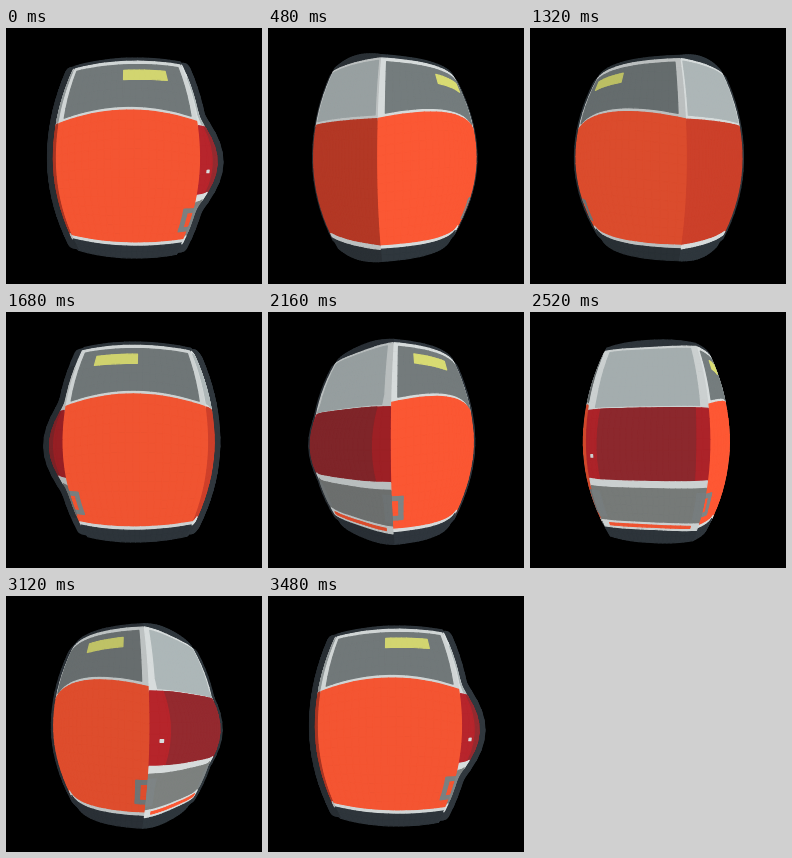
These frames come from a looping animation (256 px wide and 256 px high, 3600 ms). An HTML page with a canvas:

```html
<!DOCTYPE html>
<html>
<head>
<meta charset="utf-8">
<style>
html, body { margin: 0; width: 100%; height: 100%; overflow: hidden; background: #000; }
canvas { display: block; width: 100vw; height: 100vh; }
</style>
</head>
<body>
<canvas id="stage" width="256" height="256"></canvas>
<script>
const ctx = document.getElementById('stage').getContext('2d');
const STEP = 120, STEPS = 30, TURN = Math.PI * 2;
const MID = 128, EYE = 130, AXIS = -7;
const DARK = [46, 53, 59], PALE = [208, 213, 213], LIGHT = [168, 177, 178],
      GREY = [113, 120, 121], YELLOW = [210, 213, 112], ORANGE = [244, 85, 50],
      BRICK = [198, 62, 41], HOSE = [122, 128, 129], RED = [176, 36, 42],
      WINE = [143, 41, 46], STEEL = [121, 125, 123];
let cosA = 1, sinA = 0;

// Faces run left to right as seen from outside: corners, bulge, outward normal.
const front = { a: [-73, 40], b: [60, 56], out: [0, 22], n: [0, 1] };
const back = { a: [60, -56], b: [-73, -40], out: [0, -22], n: [0, -1] };
const pump = { a: [60, 56], b: [60, -56], out: [20, 0], n: [1, 0] };
const plain = { a: [-73, -40], b: [-73, 40], out: [-6, 0], n: [-1, 0] };
const faces = [front, back, pump, plain];

const mix = (a, b, t) => a + (b - a) * t;

function swellAt(face, u, h) {
  if (face !== pump) return 1 - u * u;
  return (1 - u ** 4) * Math.max(0.25, 1 - ((h - 5) / 45) ** 2);
}

function project(face, u, h) {
  const t = (u + 1) / 2;
  const girth = 1 - (h < 0 ? 0.4 : 0.46) * (h / 100) ** 2;
  const swell = swellAt(face, u, h);
  const px = mix(face.a[0], face.b[0], t) + face.out[0] * swell;
  const pz = mix(face.a[1], face.b[1], t) + face.out[1] * swell;
  const x = AXIS + (px - AXIS) * girth, z = pz * girth;
  const depth = z * cosA - x * sinA;
  return [
    MID + (x * cosA + z * sinA) * (1 + 0.002 * depth),
    EYE + h * (1 + 0.0045 * depth)
  ];
}

// Light comes from the right.
function shade(face, rgb) {
  const side = face.n[0] * cosA + face.n[1] * sinA;
  const k = 1 + side * (side < 0 ? 0.15 : 0.04);
  return `rgb(${rgb.map(c => Math.min(255, Math.round(c * k)))})`;
}

const at = (h, u) => typeof h === 'function' ? h(u) : h;

// Fills a patch of a face, skipping the parts turned away from the viewer.
function patch(face, u0, u1, top, bottom, rgb, line = 1.2) {
  const cols = Math.max(1, Math.ceil((u1 - u0) * 10));
  const tall = at(bottom, 0) - at(top, 0);
  const rows = Math.max(1, Math.ceil(tall / 8));
  ctx.fillStyle = ctx.strokeStyle = shade(face, rgb);
  ctx.lineWidth = line;
  for (let i = 0; i < cols; i++) {
    const l = mix(u0, u1, i / cols), r = mix(u0, u1, (i + 1) / cols);
    for (let j = 0; j < rows; j++) {
      const spot = (u, k) => project(face, u, mix(at(top, u), at(bottom, u), k / rows));
      const p = spot(l, j), q = spot(r, j), s = spot(r, j + 1), w = spot(l, j + 1);
      const area = (s[0] - p[0]) * (w[1] - q[1]) - (s[1] - p[1]) * (w[0] - q[0]);
      if (area <= 0) continue;
      ctx.beginPath();
      ctx.moveTo(...p);
      ctx.lineTo(...q);
      ctx.lineTo(...s);
      ctx.lineTo(...w);
      ctx.closePath();
      ctx.fill();
      ctx.stroke();
    }
  }
}

function drawWide(face, side) {
  const seam = u => -32 - 8 * (1 - u * u);
  const under = u => seam(u) + 3;
  const part = (u0, u1, top, bottom, rgb) =>
    side > 0 ? patch(face, u0, u1, top, bottom, rgb)
             : patch(face, -u1, -u0, top, bottom, rgb);
  part(-1, 1, -81, -78, DARK);
  part(-1, 1, -78, under, PALE);
  part(-0.91, 0.91, -75, seam, GREY);
  part(-0.05, 0.65, -70, -62, YELLOW);
  part(-1, 1, under, 68, ORANGE);
  part(-1, 1, 68, 71, PALE);
  part(-1, 1, 71, 82, DARK);
  // hose loop wrapping round the corner
  part(0.84, 1, 41, 44, HOSE);
  part(0.84, 0.9, 41, 59, HOSE);
  part(0.84, 1, 57, 60, HOSE);
}

// Dark rounded lids of a narrow face.
function drawLids(face) {
  patch(face, -1, 1, u => -81 - 4 * (1 - u * u), -78, DARK);
  patch(face, -1, 1, 71, u => 82 + 3 * (1 - u * u), DARK);
}

function drawPlain() {
  drawLids(plain);
  patch(plain, -1, 1, -78, -28, PALE);
  patch(plain, -0.95, 0.95, -76, -32, LIGHT);
  patch(plain, -1, 1, -29, 68, BRICK);
  patch(plain, -1, 1, 68, 71, PALE);
}

function drawPump() {
  drawLids(pump);
  patch(pump, -1, 1, -78, -25, PALE);
  patch(pump, -0.87, 0.87, -76, -28, LIGHT);
  patch(pump, -1, 1, -26, 30, RED);
  patch(pump, -0.76, 0.8, -26, 30, WINE);
  patch(pump, -0.9, -0.86, 10, 12, PALE);
  patch(pump, -1, 1, 30, 36, PALE);
  patch(pump, -1, 1, 36, 66, STEEL);
  patch(pump, -1, -0.86, 40, 62, HOSE);
  patch(pump, 0.86, 1, 40, 62, HOSE);
  patch(pump, -1, 1, 66, 72, PALE);
  patch(pump, -0.85, 0.85, 68, 70, ORANGE);
}

function draw(now) {
  const step = Math.floor(now / STEP) % STEPS;
  const angle = TURN * step / (STEPS - 1);
  cosA = Math.cos(angle);
  sinA = Math.sin(angle);
  ctx.fillStyle = '#000';
  ctx.fillRect(0, 0, 256, 256);
  ctx.lineJoin = 'round';
  const rim = 1 + 12 * cosA ** 4;
  for (const face of faces) patch(face, -1, 1, -74, 74, DARK, rim);
  drawWide(front, 1);
  drawWide(back, -1);
  drawPlain();
  drawPump();
}

const start = performance.now();
function tick() {
  draw(performance.now() - start);
  requestAnimationFrame(tick);
}
tick();
</script>
</body>
</html>
```
